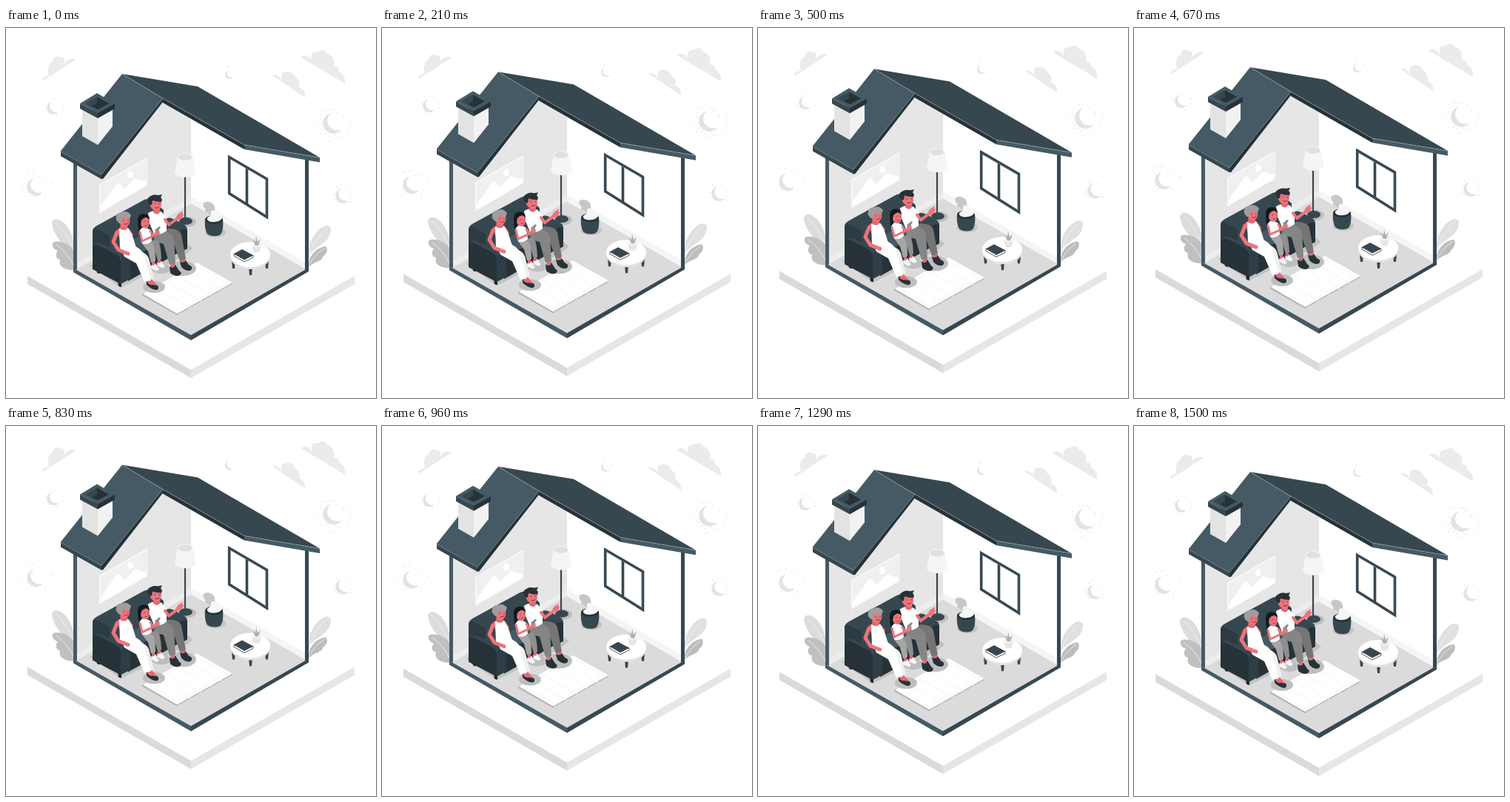
An HTML page that plays this animation: 500x500 px, repeating every 1.54 s.

```html
<!DOCTYPE html>
<html lang="en">
<head>
<meta charset="utf-8">
<title>Family at home</title>
<style>
html, body { margin: 0; width: 100%; height: 100%; overflow: hidden; background: #fff; }
svg { display: block; width: 100vw; height: 100vh; }
.line { fill: none; stroke-linecap: round; stroke-linejoin: round; }
</style>
</head>
<body>
<svg viewBox="0 0 500 500">
<g id="scene">
  <g id="sky" fill="#ebebeb">
    <path d="M49 72C49 67 53 64 58 65C55 54 58 46 63 46C64 39 70 36 73 40C78 38 80 44 78 49C82 42 90 40 94 43Z"/>
    <path d="M399 40C403 34 410 38 413 45C411 36 416 31 421 33C426 28 432 30 434 35C441 36 445 44 443 53C447 50 451 55 450 59C455 60 459 67 458 75Z"/>
    <path d="M360 64C364 61 370 66 373 71C371 64 374 58 378 60C383 57 390 62 391 67C396 69 398 75 396 80C402 82 405 88 404 94Z"/>
  </g>

  <g id="ground">
    <path fill="#dadada" d="M29 335L250 462V473L29 346Z"/>
    <path fill="#e6e6e6" d="M471 335L250 462V473L471 346Z"/>
  </g>

  <g id="bushes">
    <path fill="#dcdcdc" d="M93 303C78 296 64 280 62 264C63 257 71 257 76 262C85 267 90 282 93 294Z"/>
    <path fill="#c0c0c0" d="M93 327C80 328 70 322 73 313C65 311 68 303 70 301C62 298 61 291 65 289C76 287 88 293 93 303Z"/>
    <path fill="#e0e0e0" d="M409 304C409 288 420 270 433 267C441 266 440 276 436 283C430 292 416 297 409 308Z"/>
    <path fill="#bdbdbd" d="M409 323C408 308 420 296 432 295C436 299 433 306 428 309C428 315 416 316 409 323Z"/>
    <path class="line" stroke="#f5f5f5" stroke-width=".8" d="M67 263Q81 275 92 301M68 293Q82 302 92 322M433 271Q418 284 410 305M430 298Q417 306 410 320"/>
  </g>

  <g id="room">
    <path fill="#e6e6e6" d="M94 180L130 200L212 97L250 119V238L94 327Z"/>
    <path fill="#fff" d="M250 119L323 160L406 178V327L250 238Z"/>
    <path fill="#dbdbdb" d="M250 237L406 326L250 416L94 326Z"/>
    <path fill="#ededed" d="M96 317L250 228V237L96 326Z"/>
    <path fill="#f5f5f5" d="M250 228L404 316V325L250 237Z"/>
    <path fill="#455a64" d="M91 324.500L250 415V422L91 330Z"/>
    <path fill="#37474f" d="M409 324L250 415V422L409 329Z"/>
    <path fill="#455a64" d="M91 177H96V327L91 325Z"/>
    <path fill="#37474f" d="M404 175H409V325L404 327Z"/>
  </g>

  <g id="picture">
    <path fill="#f5f5f5" stroke="#dadada" stroke-width=".6" d="M125 211L192 173V213L125 252Z"/>
    <path fill="#f0f0f0" d="M128 213L190 178V212L128 248Z"/>
    <path fill="#fff" d="M128 241L149 211Q152 208 155 212L160 218L172 205Q176 201 179 205L190 207V212L128 248Z"/>
    <ellipse cx="168" cy="198" rx="4" ry="5" fill="#fff"/>
  </g>

  <g id="window" stroke="#37474f" fill="#fff">
    <path stroke-width="3.600" d="M301.700 174.500L352.500 204V255.500L301.700 223.500Z"/>
    <path stroke-width="3.600" d="M325.500 188V238"/>
    <path class="line" stroke="#78909c" stroke-width=".6" d="M303 177L351 205V253"/>
  </g>

  <g id="lamp">
    <ellipse cx="244" cy="262" rx="13" ry="7" fill="#bdbdbd"/>
    <ellipse cx="243" cy="261" rx="9" ry="5" fill="#37474f"/>
    <path stroke="#37474f" stroke-width="2.200" d="M242 198V260"/>
    <path fill="#f5f5f5" d="M232 174L228 195C230 204 254 204 257 195L252 174Z"/>
    <ellipse cx="242" cy="174.500" rx="10" ry="5" fill="#e0e0e0" stroke="#f7f7f7"/>
  </g>

  <g id="pot-plant">
    <ellipse cx="283" cy="276" rx="14" ry="7" fill="#c4c4c4"/>
    <path fill="#37474f" d="M269 259C268 268 270 276 273 279C278 282 286 282 290 279C293 275 294 266 293 259Z"/>
    <ellipse cx="281" cy="259" rx="12" ry="6" fill="#263238"/>
    <path fill="#c7c7c7" d="M279 259C277 250 273 252 272 249Q267 249 270 245Q265 241 267 236Q273 233 277 236C284 239 283 247 281 259Z"/>
    <path fill="#f7f7f7" d="M272 259C271 255 275 256 277 252C275 246 282 244 284 249C286 253 291 252 292 257C289 263 275 264 272 259Z"/>
  </g>

  <g id="rug">
    <path fill="#bdbdbd" d="M184 361L231 388L306 346V344L258 318L184 359Z"/>
    <path fill="#fff" d="M185 359L258 317L306 344L231 386Z"/>
    <path class="line" stroke="#f3f3f3" stroke-dasharray="3 2" d="M192 359L258 321L299 344L231 382ZM204 352L250 378M218 344L265 370M232 336L279 362M246 328L292 354"/>
    <path class="line" stroke="#b0b0b0" stroke-width="2" stroke-dasharray=".5 3" d="M185 361L231 387"/>
  </g>

  <g id="table">
    <path fill="#37474f" d="M305 315H310L309 325H306ZM328 323H333L332 334H329ZM350 315H355L354 325H351Z"/>
    <ellipse cx="330" cy="309" rx="27" ry="17" fill="#e3e3e3"/>
    <ellipse cx="330" cy="306" rx="27" ry="17" fill="#fff"/>
    <path fill="#fff" stroke="#263238" stroke-width=".8" d="M308 305L322 313L334 307V310L322 316L308 308Z"/>
    <path fill="#37474f" d="M308 305L319 299L334 307L322 313Z"/>
    <path fill="#e6e6e6" d="M332 293L334 302Q338 305 343 302L345 293Z"/>
    <ellipse cx="338.500" cy="293" rx="6.500" ry="3" fill="#f5f5f5"/>
    <path fill="#b0b0b0" d="M337 294L333 286L337 289L338 281L340 289L344 285L341 294Z"/>
  </g>

  <g id="sofa">
    <path fill="#c2c2c2" d="M113 321L155 351L196 330L240 308L253 298L240 288Z"/>
    <g fill="#bebebe">
      <ellipse cx="200" cy="350" rx="15" ry="8"/>
      <ellipse cx="210" cy="325" rx="13" ry="7"/>
      <ellipse cx="239" cy="325" rx="18" ry="10"/>
    </g>
    <path fill="#1d272c" d="M122 324H127V332L123 331ZM151 342H156V350L152 349ZM233 298H238V307H234Z"/>
    <path fill="#37474f" d="M117 275Q117 270 123 267L187 232Q194 229 200 234L213 246V285L165 325L117 300Z"/>
    <path fill="#2c3a41" d="M117 275Q118 270 123 272L140 281V302L117 295Z"/>
    <path fill="#455a64" d="M140 303L205 268L237 282L176 320Z"/>
    <path fill="#263238" d="M165 312L236 278V302L165 342Z"/>
    <path fill="#37474f" d="M214 260Q219 254 226 258L241 266Q246 269 245 277L234 282L214 273Z"/>
    <path fill="#263238" d="M233 282Q233 275 239 272Q245 270 245 278V298L233 305Z"/>
    <path fill="#37474f" d="M117 296Q120 289 128 291L163 306Q168 308 167 313L154 317Z"/>
    <path fill="#263238" d="M117 296Q119 291 126 294L149 306Q155 309 155 316V346L117 326Z"/>
    <path fill="#2f3e46" d="M155 346V315Q156 308 163 307Q168 308 168 314V339Z"/>
  </g>

  <g id="father">
    <path fill="#263238" d="M221 323L229 320L234 328Q239 331 235 334Q229 337 222 331ZM235 316L242 313L247 320Q254 323 250 327Q244 330 237 323Z"/>
    <path fill="#e5686f" d="M222 314H228V323L223 324ZM236 310H242V316L237 317Z"/>
    <path fill="#757575" d="M203 276L219 271Q234 271 237 279L243 312L235 315L225 286Z"/>
    <path fill="#858585" d="M199 275L213 274Q226 277 227 287L229 318L221 320L213 292L201 288Z"/>
    <path fill="#fff" d="M192 250Q201 244 211 249L217 257L217 274Q208 281 200 278L194 264Z"/>
    <path class="line" stroke="#ee737a" stroke-width="4" d="M215 259L220 266L232 257L237 252"/>
    <path fill="#ee737a" d="M230 255L233 251L239 247L238 252L241 251L236 259Z"/>
    <path fill="#e5686f" d="M200 242H208V249Q204 254 199 249Z"/>
    <path fill="#ee737a" d="M194 234Q202 229 210 234Q211 246 204 247Q194 246 194 234Z"/>
    <path fill="#263238" d="M194 239Q188 231 194 228Q199 224 205 226L211 225L209 229Q212 231 210 235Q203 235 198 233L197 239Z"/>
    <path class="line" stroke="#263238" stroke-width=".8" d="M201 237V238M207 237V238M202 243Q205 244 207 242"/>
  </g>

  <g id="daughter">
    <path fill="#f5f5f5" stroke="#bbb" stroke-width=".5" d="M196 321L202 318L207 326L204 329L196 325ZM204 317L210 315L215 322L212 325L205 322Z"/>
    <path fill="#e5686f" d="M197 312H201V320L197 321ZM205 309H209V317L205 318Z"/>
    <path fill="#8f8f8f" d="M188 290L203 286Q209 287 210 312L205 314L200 298Z"/>
    <path fill="#a6a6a6" d="M183 290L196 290Q202 293 202 315L196 317L192 302Z"/>
    <path fill="#fff" d="M180 272Q187 267 195 273L197 288Q190 294 184 291Z"/>
    <path class="line" stroke="#ee737a" stroke-width="3" d="M181 276L184 288L199 281M195 275L199 280L205 278"/>
    <path fill="#78909c" d="M201 273L207 268L209 269L204 277Z"/>
    <path fill="#ee737a" d="M201 275L207 273L208 278L201 281Z"/>
    <path fill="#ee737a" d="M181 258Q189 251 194 258Q195 270 188 271Q181 269 181 258Z"/>
    <path fill="#111a1f" d="M178 260Q178 251 187 251Q194 252 194 259L190 256Q186 256 183 260L182 265L183 271L179 275Z"/>
    <path class="line" stroke="#263238" stroke-width=".7" d="M187 261V262M192 261V262M188 267Q190 268 191 266"/>
  </g>

  <g id="mother">
    <path fill="#e5686f" d="M186 337L193 334L199 342L206 349L200 351L190 345Z"/>
    <path fill="#263238" d="M190 342Q193 348 198 347L205 348Q208 353 203 354Q196 353 190 347Z"/>
    <path fill="#f0f0f0" d="M168 300L185 303Q193 307 194 315L200 339L192 340L181 316Z"/>
    <path fill="#fff" d="M155 297L175 295Q188 302 188 313L196 341L187 343L176 318L160 309Z"/>
    <path fill="#ee737a" d="M150 273Q157 266 167 272L172 279L169 284L154 286Z"/>
    <path fill="#fff" d="M153 271Q159 275 165 270L171 281L176 297Q166 302 154 300Z"/>
    <path class="line" stroke="#ee737a" stroke-width="5" d="M150 276L145 289L152 300L165 305"/>
    <path fill="#e5686f" d="M155 263H164V271Q159 276 154 270Z"/>
    <path fill="#ee737a" d="M153 256Q161 251 167 256Q169 267 161 269Q152 268 153 256Z"/>
    <path fill="#9e9e9e" d="M153 264Q147 259 149 255Q149 249 157 249Q164 246 169 253L167 258Q162 256 158 257L155 264Z"/>
    <path class="line" stroke="#263238" stroke-width=".7" d="M159 260V261M165 260V261M160 265Q163 266 165 264"/>
  </g>

  <g id="roof">
    <path fill="#263238" d="M74 166L129 196L212 94V100L131 204H129L74 173Z"/>
    <path fill="#37474f" d="M74 166L129 197V204L74 173Z"/>
    <path fill="#455a64" d="M157 62L212 95L129 198L74 166Z"/>
    <path fill="#37474f" d="M157 62L259 79L424 175L322 158L212 95Z"/>
    <path fill="#263238" d="M212 95L322 158V164L212 101Z"/>
    <path fill="#455a64" d="M322 158L424 175V181.500L322 164Z"/>
    <path class="line" stroke="#b0bec5" stroke-width=".5" d="M157 62L212 95L322 158L424 175M212 95L129 198L74 167"/>
  </g>

  <g id="chimney">
    <path fill="#e3e3e3" d="M103 108L124 119V158L103 146Z"/>
    <path fill="#f2f2f2" d="M144 108L124 119V158L144 133Z"/>
    <path fill="#37474f" d="M100 102L124 115V122L100 109Z"/>
    <path fill="#263238" d="M147 102L124 115V122L147 109Z"/>
    <path fill="#455a64" d="M100 102L123 88L147 102L124 115Z"/>
    <path fill="#263238" d="M108 102L123 93L139 102L124 110Z"/>
    <path fill="#37474f" d="M108 102L123 93V102L115 106Z"/>
  </g>
</g>
</svg>
<script>
const scene = document.getElementById("scene");
const sky = document.getElementById("sky");
const LOOP = 1540, STEPS = 37, RISE = 10;

let seed = 7;
const random = () => (seed = seed * 16807 % 2147483647) / 2147483647;

// Thin pale crescent surrounded by scattered specks
function addMoon(x, y, r, reach, count) {
  let shapes = `<path d="M${x - r * .2} ${y - r}A${r} ${r} 0 1 0 ${x + r * .8} ${y + r * .6}A${r} ${r * .94} 0 0 1 ${x - r * .2} ${y - r}Z"/>`;
  for (let i = 0; i < count; i++) {
    const angle = (i + random() * .7) / count * Math.PI * 2;
    const d = r + (reach - r) * random();
    shapes += `<circle cx="${x + d * Math.cos(angle)}" cy="${y + d * Math.sin(angle)}" r="${.5 + random() * .4}"/>`;
  }
  sky.insertAdjacentHTML("beforeend", `<g fill="#e3e3e3">${shapes}</g>`);
}
addMoon(442, 129, 14, 25, 34);
addMoon(40, 215, 12, 22, 22);
addMoon(64, 108, 9, 14, 12);
addMoon(455, 227, 10, 15, 14);
addMoon(302, 63, 6, 11, 6);

// Steady rise and fall at 24 steps a second
function draw(now) {
  const step = Math.floor(now % LOOP / LOOP * STEPS);
  const lift = RISE * (1 - Math.abs(step / 18 - 1));
  scene.setAttribute("transform", `translate(0 ${-lift})`);
  requestAnimationFrame(() => draw(performance.now()));
}
draw(performance.now());
</script>
</body>
</html>
```
